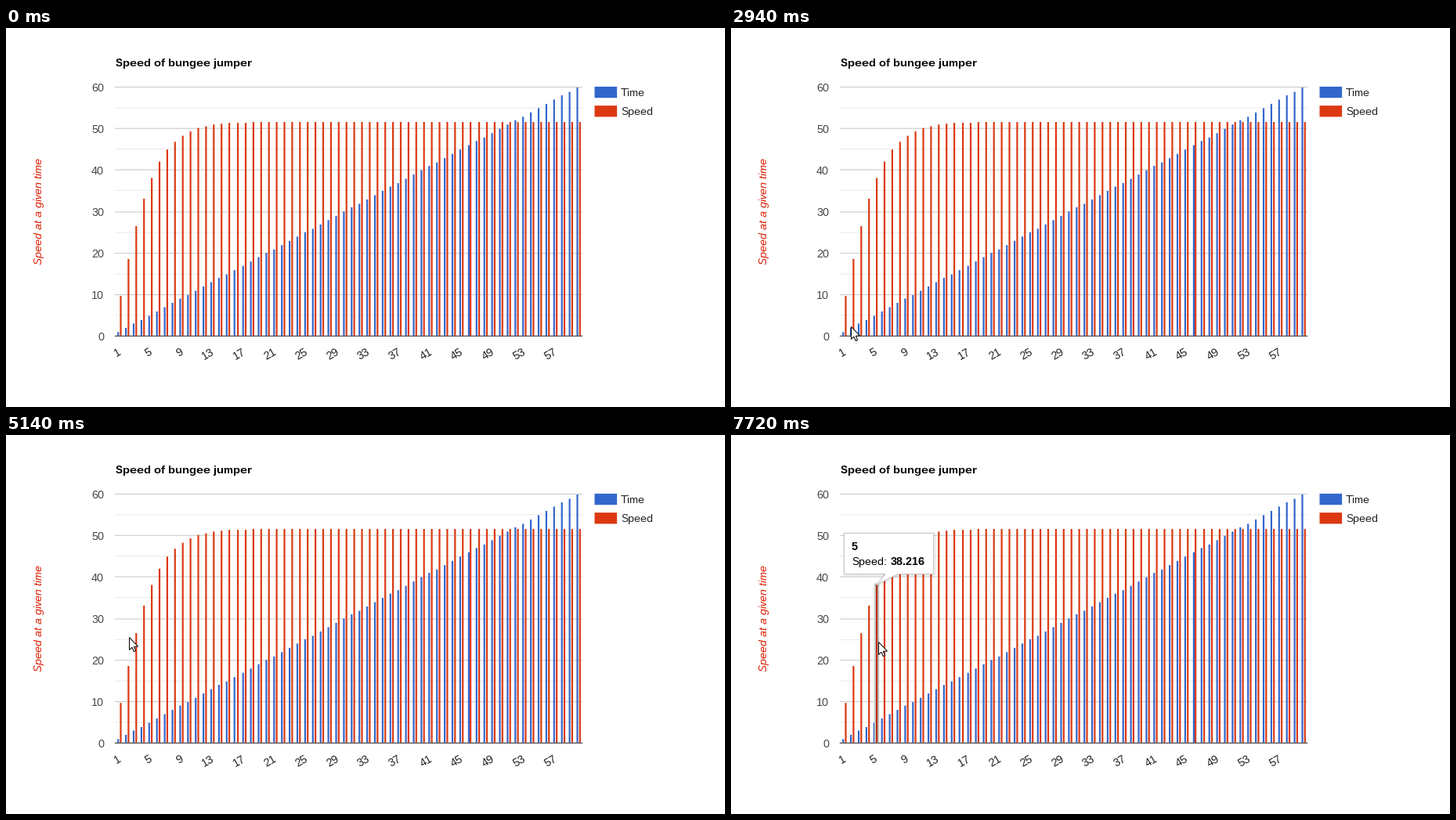
A matplotlib script that plays this animation: 918x484 px, repeating every 8 s.

```python
import math

import numpy as np
import matplotlib.pyplot as plt
from matplotlib.animation import FuncAnimation
from matplotlib.collections import PolyCollection
from matplotlib.patches import Polygon, Rectangle

W, H, DPI = 918, 484, 64
LOOP, STEP = 8000, 20
BLUE, RED = "#3366cc", "#dc3912"
FONT_PX = 14.3

# The chart is laid out on a whole-unit grid and shown at 110 % zoom.
ZOOM, SHIFT_X, SHIFT_Y = 1.1, -46, -23
AREA_X, AREA_W, AREA_TOP, AREA_H = 168, 543, 89, 289
BASE = AREA_TOP + AREA_H
UNIT = AREA_H / 60
COUNT = 60
PITCH = (AREA_W - 1) / COUNT

plt.rcParams.update({"font.family": "Liberation Sans",
                     "text.hinting": "native", "text.hinting_factor": 1})
fig = plt.figure(figsize=(W / DPI, H / DPI), dpi=DPI, facecolor="white")
ax = fig.add_axes([0, 0, 1, 1])
ax.set(xlim=(0, W), ylim=(H, 0))
ax.axis("off")


def px(n):
    return n * 72 / DPI


def zoom_x(u):
    return SHIFT_X + ZOOM * u


def zoom_y(u):
    return SHIFT_Y + ZOOM * u


def label(x, y, text, **kw):
    style = dict(fontsize=px(FONT_PX), color="#222222", va="baseline", zorder=4)
    return ax.text(x, y, text, **{**style, **kw})


def fill_rects(boxes, color, zorder):
    """Fill (x, y, width, height) boxes given in layout units."""
    quads = []
    for x, y, w, h in boxes:
        x0, x1, y0, y1 = zoom_x(x), zoom_x(x + w), zoom_y(y), zoom_y(y + h)
        quads.append([(x0, y0), (x1, y0), (x1, y1), (x0, y1)])
    ax.add_collection(PolyCollection(quads, facecolors=color, linewidths=0,
                                     snap=False, zorder=zorder))


def speed(t, g=9.81, mass=68.1, drag=0.25):
    limit = math.sqrt(g * mass / drag)
    return limit * math.tanh(g * t / limit)


# Bars: (series, index, left, top, value) with left and top in layout units
bars = []
for i in range(1, COUNT + 1):
    for name, offset, value in (("Time", 3, i), ("Speed", 6, speed(i))):
        left = round(AREA_X + offset + PITCH * (i - 1))
        bars.append((name, i, left, round(BASE + 0.8 - value * UNIT), value))


def draw_chart():
    for values, color, zorder in ((range(5, 60, 10), "#ebebeb", 1),
                                  (range(10, 61, 10), "#cccccc", 1),
                                  ((0,), "#333333", 3)):
        fill_rects([(AREA_X, round(BASE - v * UNIT), AREA_W, 1)
                    for v in values], color, zorder)

    for k, (name, color) in enumerate((("Time", BLUE), ("Speed", RED))):
        fill_rects([(x, y, 2, BASE - y) for s, _, x, y, _ in bars if s == name],
                   color, 2)
        y = AREA_TOP + 22 * k
        fill_rects([(AREA_X + AREA_W + 14, y, 26, 13)], color, 2)
        label(785, zoom_y(y) + 12.1, name)

    for v in range(0, 61, 10):
        label(125, zoom_y(BASE - v * UNIT) + 6.2, str(v), ha="right",
              color="#444444")
    for i in range(1, COUNT, 4):
        label(147.8 + ZOOM * PITCH * (i - 1), 415.6, str(i), ha="right",
              rotation=30, rotation_mode="anchor")

    label(140, 49, "Speed of bungee jumper", weight="bold", color="black")
    label(46, 234, "Speed at a given time", style="italic", color="#dd1c00",
          rotation=90, rotation_mode="anchor", ha="center")


def hit(x, y):
    for bar in bars:
        left = zoom_x(bar[2])
        if (left - 0.5 <= x <= left + 2 * ZOOM + 0.5
                and zoom_y(bar[3]) <= y <= zoom_y(BASE)):
            return bar
    return None


# Pointer states: (time, x, y, hovered bar). The tooltip lags the pointer by
# one step and ignores bars crossed in a fast sweep.
SAMPLE, SLOW = 78, 20
states = []
pointer = np.array([908.0, 519.0])
hovered = None


def glide(start, end, x, y, power=1):
    """Move the pointer to (x, y) between two times, easing out."""
    global pointer, hovered
    origin, goal = pointer, np.array([x, y])
    steps = round((end - start) / SAMPLE) + 1
    for k, t in enumerate(np.linspace(start, end, steps), 1):
        spot = goal + (origin - goal) * (1 - k / steps) ** power
        states.append((t, *spot, hovered))
        slow = math.dist(spot, pointer) < SLOW
        hovered = hit(*spot) if slow else None
        pointer = spot


glide(360, 1130, 667, 274, power=3)
glide(1210, 1440, 200, 345)
glide(1520, 1590, 171, 360)
glide(1670, 1670, 71, 380)
glide(1745, 1820, 134, 386)
glide(1970, 2140, 144, 385)
glide(2290, 2380, 147, 384)
glide(2610, 3410, 160, 377)
glide(3500, 3800, 170, 374)
glide(4120, 4350, 173, 374)
glide(4500, 4740, 156, 320)
glide(4820, 5140, 157, 258)
glide(5220, 5290, 160, 258)
glide(5370, 5680, 170, 259)
glide(6290, 6530, 182, 261, power=2.5)
glide(7100, 7720, 188, 264)

draw_chart()

ARROW = np.array([(0.5, 0.5), (0.5, 16.5), (4, 13.2), (6.3, 18.6), (8.6, 17.6),
                  (6.4, 12.3), (11.5, 12)])
cursor = ax.add_patch(Polygon(ARROW, fc="white", ec="black", lw=px(1),
                              joinstyle="miter", zorder=12))

glow = ax.add_patch(Rectangle((0, 0), 1, 1, fc="#c4c4c4", lw=0, snap=False,
                              zorder=5))
core = ax.add_patch(Rectangle((0, 0), 1, 1, fc="#b8300f", lw=0, snap=False,
                              zorder=6))
shadows = [ax.add_patch(Polygon(ARROW, fc="none", ec="black", alpha=0.04,
                                lw=px(w), joinstyle="round", zorder=7))
           for w in (3, 5)]
balloon = ax.add_patch(Polygon(ARROW, fc="white", ec="#cccccc", lw=px(1.1),
                               joinstyle="round", zorder=8))
head = label(0, 0, "", weight="bold", color="black", zorder=9)
series = label(0, 0, "", color="black", zorder=9)
amount = label(0, 0, "", weight="bold", color="black", zorder=9)
tip_parts = [glow, core, *shadows, balloon, head, series, amount]

# Text widths in em
NAME_EM = {"Time": 2.778, "Speed": 3.447}


def place_tip(bar):
    name, i, left, top, value = bar
    text = f"{math.ceil(value * 1000) / 1000:g}"
    name_w = NAME_EM[name] * FONT_PX
    text_w = sum(0.278 if c == "." else 0.556 for c in text) * FONT_PX
    bar_x, bar_y, bottom = zoom_x(left), zoom_y(top), zoom_y(BASE)
    x, y = bar_x + ZOOM, math.floor(bar_y)
    width = round(name_w + text_w + 21)
    x0 = round(x + 16 - width / 2) - 0.5
    x1, y0, y1 = x0 + width, y - 65.5, y - 13.5

    glow.set_bounds(bar_x - 2, bar_y - 2, 2 * ZOOM + 4, bottom - bar_y + 2)
    core.set_bounds(bar_x, bar_y, 2 * ZOOM, bottom - bar_y)
    core.set_facecolor("#b8300f" if name == "Speed" else "#2b56ab")
    outline = np.array([(x0, y0), (x1, y0), (x1, y1), (x + 27, y1), (x, y),
                        (x + 11, y1), (x0, y1)])
    balloon.set_xy(outline)
    for shadow in shadows:
        shadow.set_xy(outline + 0.7)

    for artist, s, dx, dy in ((head, str(i), 0, 21.5),
                              (series, name + ":", 0, 40.5),
                              (amount, text, name_w + 0.7, 40.5)):
        artist.set_text(s)
        artist.set_position((x0 + 9.5 + dx, y0 + dy))


def update(frame):
    now = frame * STEP + 14
    past = [s for s in states if s[0] <= now]
    bar = past[-1][3] if past else None
    cursor.set_visible(bool(past))
    if past:
        cursor.set_xy(ARROW + np.round(past[-1][1:3]))
    for part in tip_parts:
        part.set_visible(bar is not None)
    if bar:
        place_tip(bar)
    return [cursor, *tip_parts]


anim = FuncAnimation(fig, update, frames=LOOP // STEP, interval=STEP,
                     repeat=True, repeat_delay=0, blit=False)
plt.show()
```
